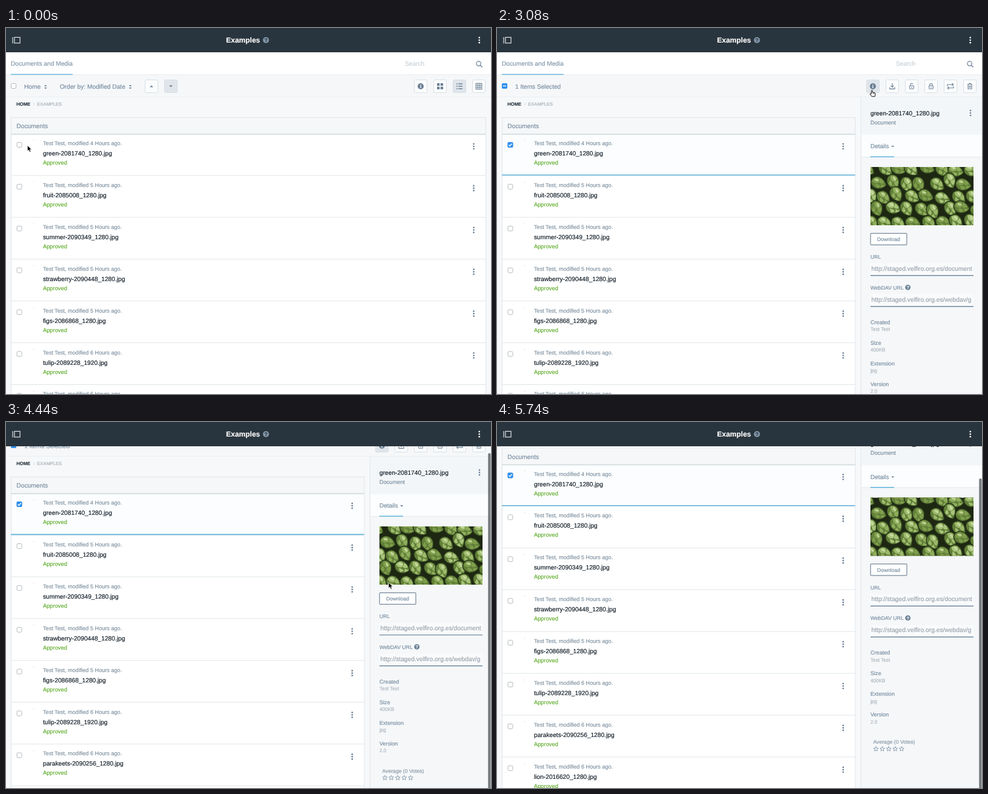
An HTML page that plays this animation: 800x603 px, repeating every 5760 ms.

```html
<!DOCTYPE html>
<html lang="en">
<head>
<meta charset="utf-8">
<title>Document library</title>
<style>
  html, body { margin: 0; width: 100%; height: 100%; overflow: hidden; background: #f6f8fa; }
  svg { display: block; }
  text { font-family: "Liberation Sans", Arial, sans-serif; white-space: pre; text-rendering: geometricPrecision; }
</style>
</head>
<body>
<svg id="stage" width="800" height="603" viewBox="0 0 800 603"></svg>
<script>
const LOOP = 5760;
const PAGE = '#f6f8fa', BLUE = '#5fb3da', CHECK = '#2f8fee', SLATE = '#6b8095',
      MUTED = '#7d909f', INK = '#0e1a24', EDGE = '#d8dfe4', CARD_EDGE = '#e1e6ea', LABEL = '#768c9f';

// Drawing helpers, each returning markup
const text = (x, y, s, size, fill, more = '') =>
  `<text x="${x}" y="${y}" font-size="${size}" fill="${fill}" stroke="${fill}" stroke-width=".16" ${more}>${s}</text>`;
const rect = (x, y, w, h, fill, more = '') =>
  `<rect x="${x}" y="${y}" width="${w}" height="${h}" fill="${fill}" ${more}/>`;
const circle = (x, y, r, fill, more = '') =>
  `<circle cx="${x}" cy="${y}" r="${r}" fill="${fill}" ${more}/>`;
const path = (d, fill, stroke = 'none', width = 1, more = '') =>
  `<path d="${d}" fill="${fill}" stroke="${stroke}" stroke-width="${width}" ${more}/>`;
const hline = (x, y, w, color, width = 1) => path(`M${x} ${y}h${w}`, 'none', color, width);
const group = (id, body) => `<g id="${id}">${body}</g>`;
const at = (x, y, body) => `<g transform="translate(${x} ${y})">${body}</g>`;
const BOLD = 'font-weight="bold"', MIDDLE = 'text-anchor="middle"';

const dots = (x, y, color = SLATE, gap = 4) =>
  [-gap, 0, gap].map(d => circle(x, y + d, 1.35, color)).join('');
const checkbox = (x, y) =>
  rect(x + .5, y + .5, 8, 8, '#fff', 'rx="1.8" stroke="#b4b9bd"');
const checkedBox = (x, y, mark) =>
  rect(x, y, 9, 9, CHECK, 'rx="1.8"') + at(x, y, path(mark, 'none', '#fff', 1.4));
const help = (x, y, r, fill, ink) => circle(x, y, r, fill) +
  text(x, y + r * .62, '?', r * 1.7, ink, `${BOLD} ${MIDDLE}`);
const sortMark = x => path(`M${x - 2.2} 96l2.2-2.6 2.2 2.6zM${x - 2.2} 98l2.2 2.6 2.2-2.6z`, SLATE);

// Toolbar icons, centred on the origin
const padlock = shackle => rect(-3.3, -1, 6.6, 5.2, 'none', `rx=".6" stroke="${SLATE}" stroke-width="1.1"`) +
  path(shackle, 'none', SLATE, 1.1) + path('M0 .7v1.8', 'none', SLATE, 1.2);
const icons = {
  up: path('M-3 1.5l3-3 3 3z', SLATE),
  down: path('M-3-1.5l3 3 3-3z', SLATE),
  info: circle(0, 0, 5, SLATE) + path('M0-3v1.4M0-.7v3.8', 'none', '#fff', 1.4),
  cards: [[-5, -5], [.8, -5], [-5, .8], [.8, .8]].map(([x, y]) => rect(x, y, 4.2, 4.2, SLATE)).join(''),
  list: [-4, 0, 4].map(y => path(`M-5 ${y}h1.8M-1.8 ${y}h6.8`, 'none', SLATE, 1.3)).join(''),
  table: rect(-4.8, -4.8, 9.6, 9.6, 'none', `stroke="${SLATE}" stroke-width="1.1"`) +
    path('M-4.8-1.6h9.6M-4.8 1.6h9.6M-1.6-4.8v9.6M1.6-4.8v9.6', 'none', SLATE, 1),
  download: path('M0-5v6M-2.5-1.2l2.5 2.5 2.5-2.5M-4 1.5v2.8h8v-2.8', 'none', SLATE, 1.2),
  unlock: padlock('M-2-1v-1.8a2 2 0 0 1 3.8-.8'),
  lock: padlock('M-2-1v-1.8a2 2 0 0 1 4 0v1.8'),
  swap: path('M-5 0v-2.8h9M2.4-5l2.4 2.2-2.4 2.2M5 0v2.8h-9M-2.4 .6l-2.4 2.2 2.4 2.2', 'none', SLATE, 1.1),
  trash: path('M-4-3.2h8M-1.5-4.6h3M-3-3v7.2h6v-7.2M-1-1.3v3.8M1-1.3v3.8', 'none', SLATE, 1.1)
};
const button = (x, icon, fill = '#fbfcfd', id = '') =>
  rect(x + .5, 85.5, 21, 21, fill, `rx="2" stroke="${EDGE}" ${id && `id="${id}"`}`) + at(x + 11, 96, icons[icon]);
const ACTIVE = '#dfe5ea';

const files = [
  ['green-2081740_1280.jpg', 4], ['fruit-2085008_1280.jpg', 5], ['summer-2090349_1280.jpg', 5],
  ['strawberry-2090448_1280.jpg', 5], ['figs-2086868_1280.jpg', 5], ['tulip-2089228_1920.jpg', 6],
  ['parakeets-2090256_1280.jpg', 6], ['lion-2016620_1280.jpg', 6]
];
const rowTop = i => 175 + 68.9 * i;

const fileRow = ([name, hours], i) => at(0, rowTop(i),
  checkbox(17.5, 13) + rect(45, 9.5, 1.2, 1, '#c3c8cc') +
  text(61, 18, `Test Test, modified ${hours} Hours ago.`, 9.15, MUTED) +
  text(61, 35, name, 10.2, INK) + text(61, 50, 'Approved', 9.3, '#5dab28') +
  hline(8, 68, 784, '#e0e5e8'));

// A heap of green buds: pale scales over a darker body, tips pointing down right
function photo() {
  let seed = 11, body = rect(0, 0, 170, 96, '#1d2711');
  const rand = () => (seed = (seed * 16807) % 2147483647) / 2147483647;
  const greens = ['#8fae5c', '#9dba6c', '#7f9e4c', '#a9c47b'];
  for (let row = 0; row < 5; row++) for (let col = 0; col < 8; col++) {
    const x = col * 24 + (row % 2) * 12 + rand() * 8 - 6, y = row * 22 + rand() * 8;
    body += `<g transform="translate(${x} ${y}) rotate(${10 + rand() * 60})">` +
      path('M-13 0q2-11 13-10 9 2 14 10-5 9-14 10-11 0-13-10z', '#617f37', '#26341a', 1.4) +
      path('M-11-1q3-8 9-7 4 3 2 8-6 4-11-1zM1-8q6 1 8 6-4 3-8 1zM-5 3q6-1 9 1 0 4-5 4zM5 1q4 0 7 0-2 4-6 5z',
        greens[Math.floor(rand() * 4)]) +
      '<ellipse cx="-4" cy="-4" rx="3.6" ry="1.8" fill="#cfdfa8" opacity=".8"/></g>';
  }
  return `<svg x="616" y="229" width="170" height="96">${body}</svg>`;
}

const field = (y, value) => rect(616, y - 12, 170, 20, '#f9fafb') +
  text(617.5, y, value, 10.27, '#98a3ad') + hline(616, y + 8.1, 170, '#7089a1', 1.4);
const fact = ([label, value], i) => text(616, 487.5 + 34 * i, label, 9.1, LABEL) +
  text(616, 499 + 34 * i, value, 8.2, '#aab4bd');

function star(x, y) {
  const points = Array.from({ length: 10 }, (_, i) => {
    const r = i % 2 ? 1.8 : 4.1, a = i * Math.PI / 5;
    return `${(x + r * Math.sin(a)).toFixed(2)} ${(y - r * Math.cos(a)).toFixed(2)}`;
  });
  return path(`M${points.join('L')}z`, 'none', '#8497a8', .9);
}

const panel = rect(591.5, 114, 420, 700, PAGE) + rect(600.5, 114, 210, 700, '#f5f7f9') +
  rect(600.5, 114, 210, 62, '#f3f6f8') + rect(600.5, 176, 210, 36.5, '#fcfdfe') +
  hline(600.5, 212.5, 210, '#e4e9ec') + path('M600.5 114v700', 'none', '#e2e7eb') +
  path('M591 147.5v660', 'none', CARD_EDGE) +
  text(616, 143.5, files[0][0], 10.2, INK) + text(616, 158.5, 'Document', 9.2, LABEL) + dots(781, 140) +
  text(616, 198.2, 'Details', 10, LABEL) + path('M650.2 194h5l-2.5 2.6z', SLATE) + hline(616, 212.2, 39, BLUE, 1.5) +
  photo() + rect(616.2, 338.4, 59.8, 19, '#fdfefe', 'rx="1.2" stroke="#77899a" stroke-width="1.2"') +
  text(646, 351, 'Download', 8.5, LABEL, MIDDLE) +
  text(616, 380, 'URL', 8.6, LABEL) + field(399.7, 'http://staged.velfiro.org.es/document') +
  text(616, 430.7, 'WebDAV URL', 8.7, LABEL) + help(677.7, 427.3, 4.4, SLATE, '#fff') +
  field(450.6, 'http://staged.velfiro.org.es/webdav/g') +
  [['Created', 'Test Test'], ['Size', '400KB'], ['Extension', 'jpg'], ['Version', '2.0']].map(fact).join('') +
  text(620.5, 634.5, 'Average (0 Votes)', 8.65, '#8797a5') +
  [0, 1, 2, 3, 4].map(i => star(625 + 10.6 * i, 643.2)).join('');

const browseBar = checkbox(8, 91) + text(30, 100, 'Home', 10.2, LABEL) + sortMark(65.3) +
  text(88.7, 100, 'Order by: Modified Date', 10.2, LABEL) + sortMark(205) +
  button(229, 'up') + button(261, 'down', ACTIVE) +
  button(673, 'info') + button(705, 'cards') + button(737, 'list', ACTIVE) + button(769, 'table');

const selectBar = checkedBox(8, 91, 'M2 4.5h5') + text(30, 100, '1 Items Selected', 10.1, LABEL) +
  button(609, 'info', '#fbfcfd', 'infoButton') +
  ['download', 'unlock', 'lock', 'swap', 'trash'].map((icon, i) => button(641 + 32 * i, icon)).join('');

const selectedMarks = hline(8, 242.3, 784, BLUE, 1.6) + checkedBox(17.5, 188, 'M2 4.6l1.8 1.9 3.3-4');

const content = rect(0, 39, 800, 38, '#fff') + hline(0, 77, 800, '#e2e7ea') +
  text(8, 62, 'Documents and Media', 10.2, '#7f95a8') + hline(8, 76.5, 102, BLUE, 1.5) +
  text(658, 62, 'Search', 10.2, '#c6ced5') + circle(779.6, 58.6, 3.7, 'none', `stroke="${SLATE}" stroke-width="1.2"`) +
  path('M782.4 61.4l3.2 3.2', 'none', SLATE, 1.4) +
  rect(0, 77.5, 800, 36, '#f5f7f9') + hline(0, 113.5, 800, '#eceff2') +
  group('browse', browseBar) + group('select', selectBar) +
  text(17.3, 128, 'HOME', 7.65, '#26333d', BOLD) + path('M45.5 123l2 2.3-2 2.3', 'none', '#c8ced3', .8) +
  text(51.2, 128, 'EXAMPLES', 7.6, '#a5aeb5') +
  rect(8.5, 147.5, 783, 700, '#fff', `stroke="${CARD_EDGE}"`) + rect(9, 148, 782, 27, '#f5f7f8') +
  group('tint', rect(9, 175, 782, 67, '#fbfdfe')) +
  hline(8, 175, 784, '#cfd8dd', 1.4) + text(17.3, 165, 'Documents', 10.25, LABEL) +
  files.map(fileRow).join('') + group('selected', selectedMarks) +
  group('menus', files.map((_, i) => dots(771.5, rowTop(i) + 20)).join('')) + group('panel', panel) +
  group('tooltip', rect(608, 59, 25, 22, '#0b151d', 'rx="2.5"') + path('M616.5 81h7l-3.5 3.5z', '#0b151d') +
    text(620.4, 73, 'Info', 9, '#fff', MIDDLE));

const header = rect(0, 0, 800, 40, '#29353e') +
  path('M11 15v10.4', 'none', '#dfe4e8', 1.2) + rect(13.9, 15.4, 9.2, 9.4, 'none', 'stroke="#dfe4e8" stroke-width="1.2"') +
  text(363, 24.3, 'Examples', 12, '#fff', BOLD) + help(428.8, 20, 5, '#8195a8', '#29353e') + dots(780.7, 20, '#fff', 4.2);

const arrow = path('M0 0v9.4l2.2-2 1.5 3.5 1.9-.8-1.5-3.4h3z', '#000', '#fff', .8);
const hand = path('M-.9 1q.9-1.6 1.8 0v3l3.6 .8q1.2.4 1 1.8l-.6 4.2h-5.2l-3-4.2q.6-1.4 2.4 0z', '#fff', '#111', 1) +
  path('M1.8 4.6v2M3.6 5v1.8', 'none', '#111', .7);

document.getElementById('stage').innerHTML = rect(0, 0, 800, 603, PAGE) + group('scroll', content) + header +
  group('thumb', rect(795.2, 0, 4.3, 700, 'rgba(20,25,30,.56)', 'rx="2.1"')) +
  group('cursor', group('arrow', arrow) + group('hand', hand));

const $ = Object.fromEntries([...document.querySelectorAll('[id]')].map(el => [el.id, el]));
const show = (el, on) => el.setAttribute('visibility', on ? 'visible' : 'hidden');
const move = (el, x, y) => el.setAttribute('transform', `translate(${x.toFixed(2)} ${y.toFixed(2)})`);
const progress = (t, from, to) => Math.min(1, Math.max(0, (t - from) / (to - from)));
const smooth = u => u * u * (3 - 2 * u);

const SELECT = 820, HOVER = 1960, PRESS = 2560, SCROLL = 4283, HIDE = 5400;
// Pointer moves: start, end, x, y
const moves = [[200, 640, 22, 190], [1150, 1950, 618.5, 102], [3400, 3950, 631, 264.5]];

function pointer(t) {
  let x = 35.3, y = 193.5;
  for (const [from, to, toX, toY] of moves) {
    const u = smooth(progress(t, from, to));
    x += (toX - x) * u;
    y += (toY - y) * u;
  }
  return [x, y];
}

function render(t) {
  const [x, y] = pointer(t);
  const overInfo = x > 609 && x < 631 && y > 85 && y < 107;
  const chosen = t >= SELECT, opened = t >= PRESS;
  const open = smooth(progress(t, PRESS + 40, PRESS + 340));
  const offset = 104.5 * (1 - (1 - progress(t, SCROLL, SCROLL + 600)) ** 2.576);

  show($.browse, !chosen);
  show($.select, chosen);
  show($.tint, chosen);
  show($.selected, chosen);
  show($.tooltip, t >= HOVER && !opened);
  $.infoButton.setAttribute('fill', opened ? ACTIVE : '#fbfcfd');
  move($.panel, 200.5 * (1 - open), 0);
  move($.menus, -200.5 * open, 0);
  move($.scroll, 0, -offset);
  move($.thumb, 0, 1.5 + .875 * offset);
  show($.thumb, t >= SCROLL);
  move($.cursor, x, y);
  show($.arrow, t < HIDE && !overInfo);
  show($.hand, t < HIDE && overInfo);
}

const start = performance.now();
function tick() {
  render((performance.now() - start) % LOOP);
  requestAnimationFrame(tick);
}
tick();
</script>
</body>
</html>
```
